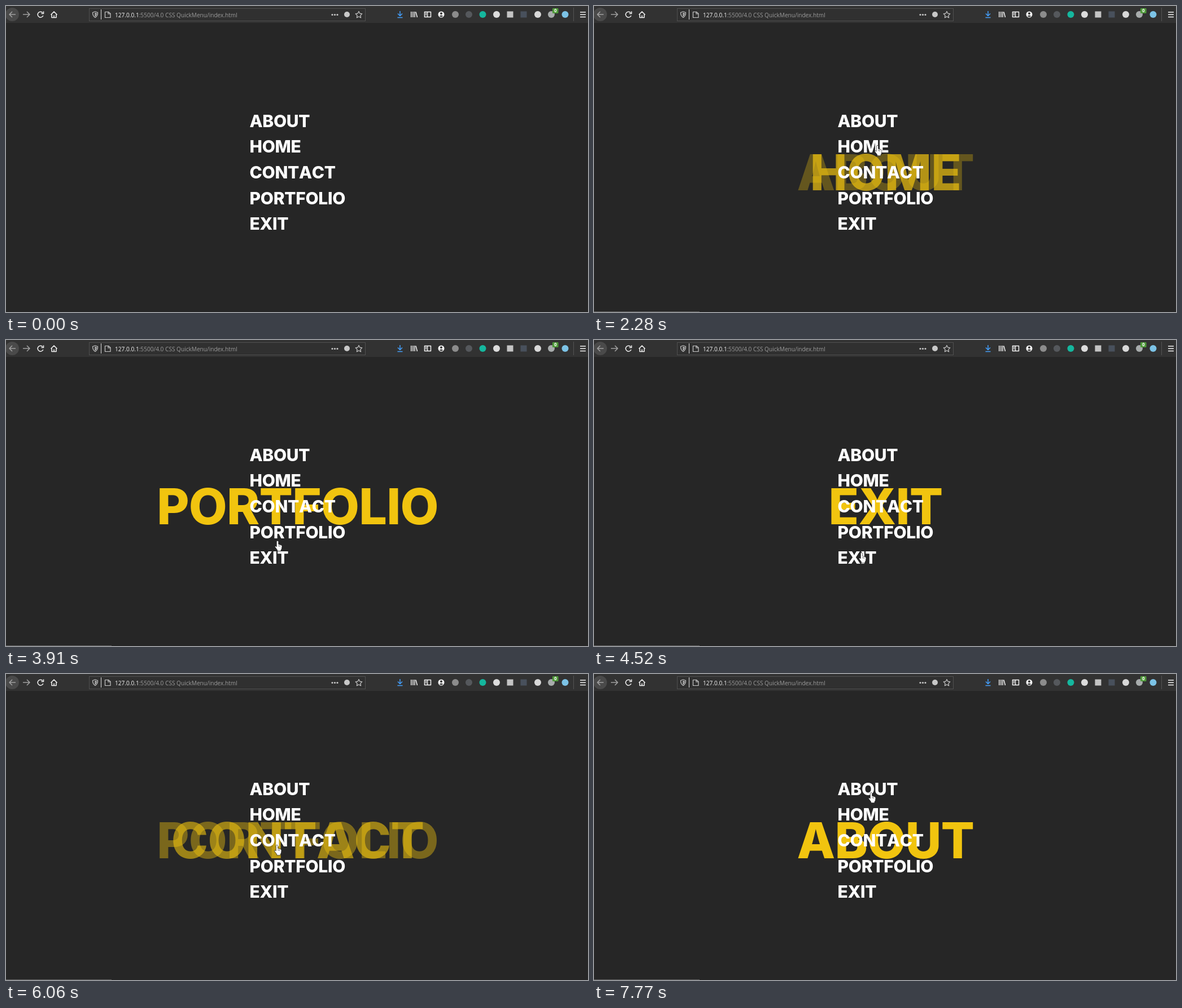
Recreate the animation shown at these times as an HTML page. Size 1031 px wide and 543 px high, loop 8 s.

```html
<!DOCTYPE html>
<html lang="en">
<head>
<meta charset="utf-8">
<title>Quick menu</title>
<style>
  html, body { margin: 0; width: 100%; height: 100%; overflow: hidden; background: #262626; }
  svg { display: block; }
  .menu, .big { font: 800 30px Inter, "Open Sans", sans-serif; font-optical-sizing: none; font-kerning: none; }
  .menu { fill: #fff; letter-spacing: -.3px; }
  .big { font-size: 88px; letter-spacing: -.8px; text-anchor: middle; fill: #f1c40f; }
  .big text { opacity: 0; }
  .url { font: 10.1px "Open Sans", "Noto Sans", sans-serif; fill: #9b9b9b; }
  .badge { font: 700 8px "Open Sans", sans-serif; fill: #fff; text-anchor: middle; }
  .line { fill: none; stroke: #f4f4f4; stroke-width: 1.5; stroke-linejoin: round; }
  .dim { stroke: #a0a0a0; }
  .soft { stroke: #c8c8c8; stroke-width: 1.2; }
  .cursor path { fill: #fff; stroke: #1a1a1a; stroke-width: .7; stroke-linejoin: round; }
</style>
</head>
<body>
<svg width="1031" height="543" viewBox="0 0 1031 543">
  <rect width="1031" height="543" fill="#262626"/>

  <g id="toolbar">
    <rect width="1031" height="30" fill="#323232"/>
    <circle cx="11" cy="15" r="12" fill="#4a4a4a"/>
    <path class="line dim" d="M17 15H6m5-5-5 5 5 5M30 15h12m-5-5 5 5-5 5"/>
    <path class="line" d="M65 12a5 5 0 1 0 .8 5M66.500 9.500v4h-4"/>
    <path class="line" d="M79.500 15.500 85 10l5.500 5.500M81 15v5.500h8V15M85 20v-3.500"/>

    <rect x="147.500" y="4.500" width="489" height="22" fill="#303030" stroke="#505050"/>
    <path class="line soft" d="M158 10l4.500 1.500c0 4-1 7-4.500 9-3.500-2-4.500-5-4.500-9zM158 12.500v5.500c2-1.500 2.300-3 2.300-4.700z"/>
    <path d="M168.500 6v18" stroke="#e0e0e0"/>
    <path class="line soft" d="M175.500 10.500h6l3.500 3v7h-9.500zM181 10.500v3.500h4"/>
    <text class="url" x="193" y="19.600"><tspan fill="#f4f4f4">127.0.0.1</tspan>:5500/4.0 CSS QuickMenu/index.html</text>
    <g fill="#c8c8c8">
      <circle cx="578" cy="15.500" r="1.600"/><circle cx="582.500" cy="15.500" r="1.600"/><circle cx="587" cy="15.500" r="1.600"/>
      <circle cx="604" cy="15" r="5"/>
    </g>
    <path class="line soft" d="M625 9.500l1.800 3.700 4 .6-2.900 2.900.7 4.100-3.600-2-3.600 2 .7-4.100-2.900-2.900 4-.6z"/>

    <path class="line" style="stroke:#45a1ff" d="M698 9v8.500m-4-4 4 4 4-4M693.500 20.500h9"/>
    <path class="line" d="M717.800 10v10M721 10v10M724 10v10M726 10.500l2.500 9.500"/>
    <path class="line" d="M741.500 10.500h11v9h-11zM746.500 10.500v9M743 13h2m-2 2.500h2"/>
    <circle cx="771" cy="15" r="5.500" fill="#f4f4f4"/>
    <path d="M771 11.200a2 2 0 0 1 0 4 2 2 0 0 1 0-4M767.800 18q3.200-3 6.400 0-3.200 2.600-6.400 0" fill="#323232"/>
    <g id="addons"></g>
    <rect x="968" y="4" width="10.500" height="9" rx="1" fill="#4f9a3a"/>
    <text class="badge" x="973.200" y="11.400">0</text>
    <path d="M1005.500 3v24" stroke="#555"/>
    <path class="line" d="M1017 11h10m-10 4.200h10m-10 4.200h10"/>
  </g>

  <g class="big" id="big"></g>
  <g class="menu" id="menu"></g>
  <rect id="status" y="542" width="187" height="1" fill="#606060"/>

  <g class="cursor" id="cursor">
    <path id="arrow" d="M0 0v16l3.700-3.500 2.400 5.400 2.500-1.100-2.300-5.300h5z"/>
    <g id="hand">
      <path d="M-1.700 1.500q1.700-2.700 3.400 0v5l4.500 1.200q1.900.7 1.800 2.800l-.6 4-1.400 2.500v1.700h-6.200v-1.700l-4.200-5.700q-.5-1.900 1.400-1.600l1.300 1.300z"/>
      <path d="M2 8v2.500M4.200 8.500v2.500"/>
    </g>
  </g>
</svg>

<script>
const LOOP = 8000;
const STEP = 77.26;
const FIRST_STEP = 430;
const SLACK = 17;
const FADE = 500;
const words = ["ABOUT", "HOME", "CONTACT", "PORTFOLIO", "EXIT"];

// [time, hovered word]; each hover lasts until the next one
const hovers = [
  [880, "HOME"], [1130, "ABOUT"], [2080, "HOME"], [2580, "CONTACT"], [3270, "PORTFOLIO"],
  [4030, "EXIT"], [4990, "PORTFOLIO"], [5900, "CONTACT"], [6438, "HOME"], [7280, "ABOUT"]
];

// [time, x, y] of the pointer tip
const path = [
  [0, 980, 600], [425, 980, 600], [430, 925, 527], [507, 781, 369], [740, 781, 369],
  [880, 600, 263], [1130, 536, 226], [1300, 508, 210], [1880, 508, 210], [2080, 505, 228],
  [2580, 498, 274], [3290, 491, 321], [3520, 488, 333], [4030, 479, 363], [4370, 474, 377],
  [4700, 474, 377], [4990, 476, 362], [5520, 479, 344], [5660, 479, 344], [5900, 480, 318],
  [6430, 481, 272], [6680, 481, 257], [7280, 488, 226], [7700, 491, 210], [LOOP, 491, 210]
];

// toolbar add-ons: [x, colour, shape]
const addons = [
  [796, "#8c8c8c", "circle"], [820, "#55585c", "circle"], [844.5, "#15b79e", "circle"],
  [869, "#dcdcdc", "circle"], [893, "#c4c4c4", "rect"], [917, "#48505c", "rect"],
  [942, "#d8d8d8", "circle"], [966, "#a8acac", "circle"], [990.5, "#7cc3e6", "circle"]
];

const $ = id => document.getElementById(id);

function add(parent, tag, attrs, text = "") {
  const el = document.createElementNS("http://www.w3.org/2000/svg", tag);
  for (const key in attrs) el.setAttribute(key, attrs[key]);
  el.textContent = text;
  return parent.appendChild(el);
}

for (const [x, fill, shape] of addons) {
  add($("addons"), shape, shape === "circle"
    ? { cx: x, cy: 15, r: 6, fill }
    : { x: x - 5.5, y: 9.5, width: 11, height: 11, fill });
}

const bigWords = words.map((word, i) => {
  add($("menu"), "text", { x: 431.5, y: 214.8 + 45.6 * i }, word);
  return add($("big"), "text", { x: 516.5, y: 327 }, word);
});

const bezier = (a, b, u) => 3 * a * u * (1 - u) ** 2 + 3 * b * u * u * (1 - u) + u ** 3;

// The CSS "ease" curve
function ease(p) {
  if (p <= 0 || p >= 1) return p <= 0 ? 0 : 1;
  let low = 0, high = 1;
  for (let i = 0; i < 20; i++) {
    const mid = (low + high) / 2;
    if (bezier(.25, .25, mid) < p) low = mid; else high = mid;
  }
  return bezier(.1, 1, low);
}

function opacityOf(word, t) {
  let opacity = 0;
  hovers.forEach(([start, name], i) => {
    if (name !== word || t < start) return;
    const end = i + 1 < hovers.length ? hovers[i + 1][0] : Infinity;
    const reached = ease((Math.min(t, end) - start) / FADE);
    const left = t > end ? 1 - ease((t - end) / (FADE * reached)) : 1;
    opacity = Math.max(opacity, reached * left);
  });
  return opacity;
}

function pointerAt(t) {
  const i = Math.max(1, path.findIndex(p => p[0] >= t));
  const [t0, x0, y0] = path[i - 1], [t1, x1, y1] = path[i];
  const p = (t - t0) / (t1 - t0);
  return [x0 + (x1 - x0) * p, y0 + (y1 - y0) * p];
}

function draw(time) {
  const steps = Math.floor((time - FIRST_STEP + SLACK) / STEP);
  const t = Math.max(0, FIRST_STEP + steps * STEP);
  const show = (id, on) => { $(id).style.display = on ? "" : "none"; };
  const overLink = t >= hovers[0][0];

  words.forEach((word, i) => { bigWords[i].style.opacity = opacityOf(word, t); });
  $("cursor").setAttribute("transform", `translate(${pointerAt(t).map(Math.round)})`);
  show("arrow", !overLink);
  show("hand", overLink);
  show("status", t >= 1500);
}

const start = performance.now();
function tick() {
  draw((performance.now() - start) % LOOP);
  requestAnimationFrame(tick);
}
tick();
</script>
</body>
</html>
```
